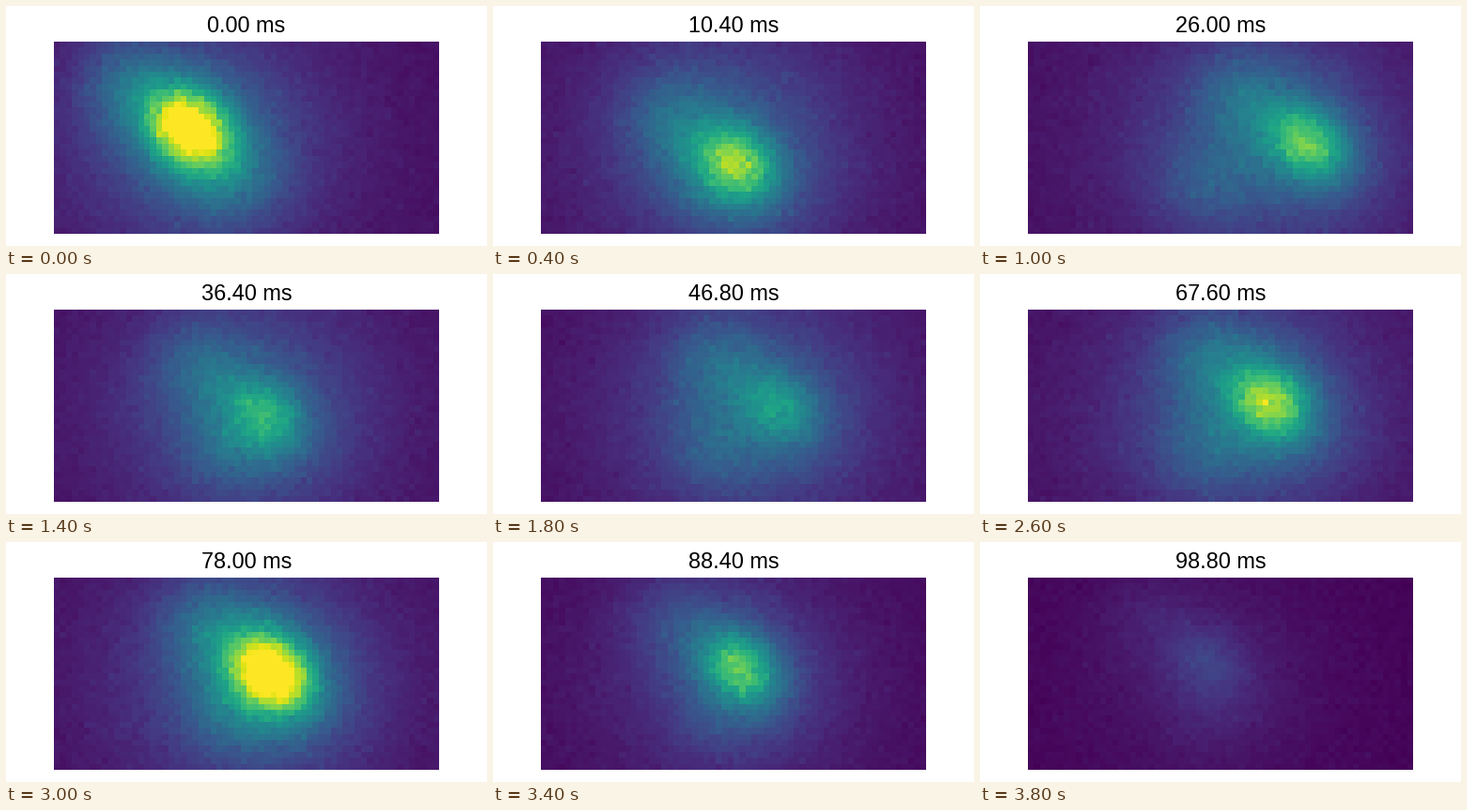
A matplotlib script for the animation above (4000 ms loop, 512 by 256 pixels).

```python
import numpy as np
import matplotlib.pyplot as plt
from matplotlib.animation import FuncAnimation

plt.rcParams["font.family"] = "Liberation Sans"

COLS, ROWS = 64, 32
FRAMES, INTERVAL = 20, 200
STEP_MS = 5.2
TILT = np.radians(38)

# Key points of the bright spot's path
STEPS = [0, 2, 5, 7, 11, 15, 19]
PATH_X = [22, 32, 46, 34.5, 44, 35.5, 29.5]
PATH_Y = [14, 19.8, 16.5, 17, 14.5, 15.3, 13.5]
HEIGHT = [.72, .4, .4, .28, .19, .75, .1]

X, Y = np.meshgrid(np.arange(COLS), np.arange(ROWS))


def blob(x, y, sx, sy, tilt=0):
    """Gaussian bump, its long axis turned clockwise by tilt."""
    dx, dy = X - x, Y - y
    u = dx * np.cos(tilt) + dy * np.sin(tilt)
    v = dy * np.cos(tilt) - dx * np.sin(tilt)
    return np.exp(-(u / sx) ** 2 / 2 - (v / sy) ** 2 / 2)


def field(k):
    x, y, h = (np.interp(k, STEPS, p) for p in (PATH_X, PATH_Y, HEIGHT))
    ambient = np.interp(k, [15, 19], [1, .25])

    core = blob(x, y, 4.8, 3.7, TILT)
    halo = blob(x, y, 9, 7, TILT)
    glow = blob(.6 * x + 10.5, 16, 16, 15)
    upper_arm = blob(x - 11, y - 8, 5.5, 5.5)
    lower_arm = blob(29, 23, 6, 5)

    v = h * (core + .4 * halo)
    v += ambient * (.04 + .2 * glow + .13 * upper_arm + .11 * lower_arm)
    noise = np.random.default_rng(100 + k).standard_normal(v.shape)
    return v + (.006 + .035 * v) * noise


fig = plt.figure(figsize=(4, 2), dpi=128, facecolor="white")
ax = fig.add_axes([.1, .05, .8, .8])
ax.axis("off")
image = ax.imshow(field(0), cmap="viridis", vmin=0, vmax=1,
                  interpolation="nearest", aspect="auto")
title = ax.set_title("0.00 ms", fontsize=13.2, pad=6)


def update(k):
    image.set_data(field(k))
    title.set_text(f"{k * STEP_MS:.2f} ms")
    return image, title


anim = FuncAnimation(fig, update, frames=FRAMES, interval=INTERVAL,
                     repeat=True, repeat_delay=0, blit=False)
plt.show()
```
